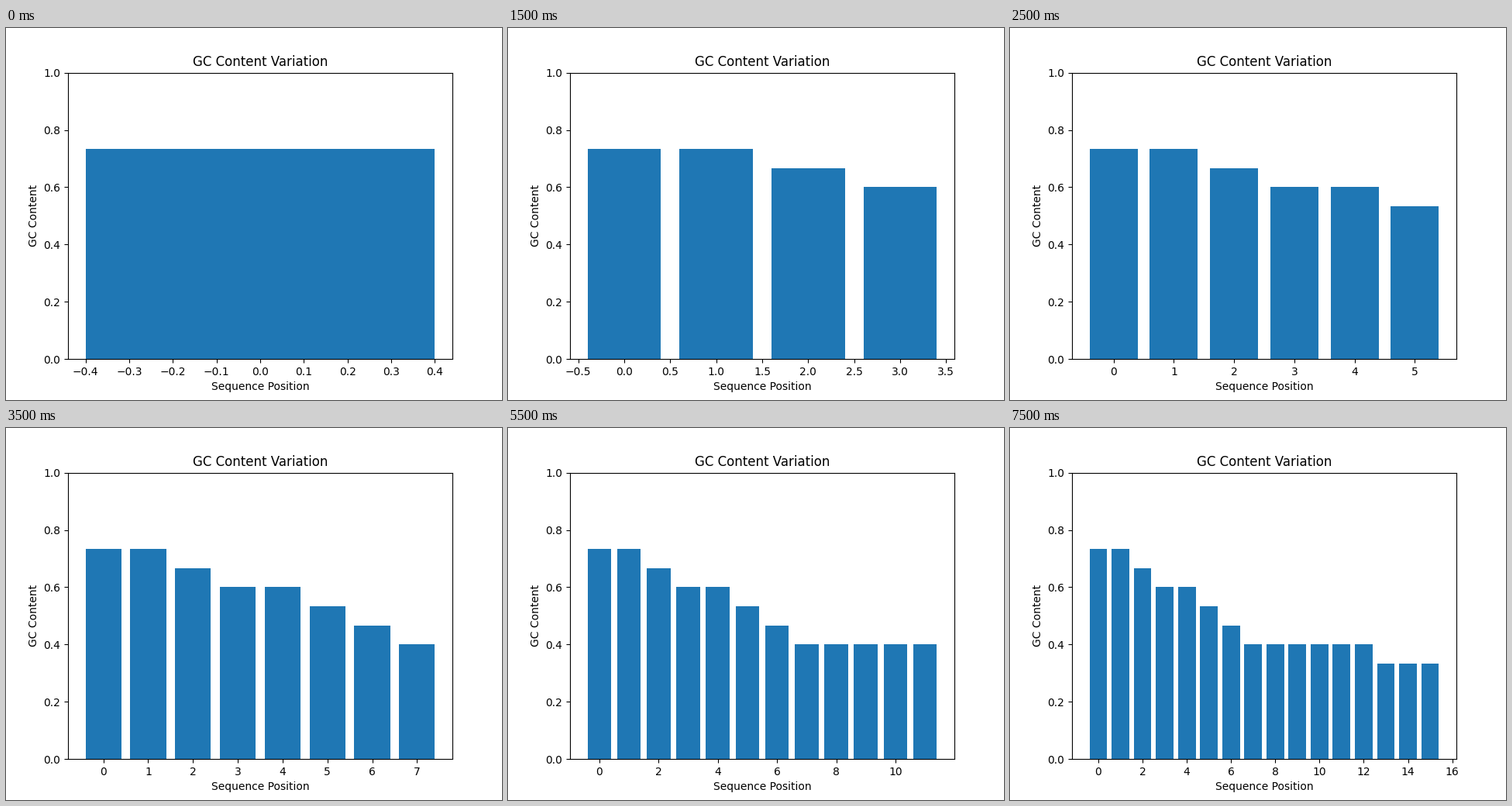
A matplotlib script that plays this animation: 640x480 px, repeating every 8 s.

```python
import matplotlib.pyplot as plt
from matplotlib.animation import FuncAnimation

WINDOW = 15
GC_COUNTS = [11, 11, 10, 9, 9, 8, 7, 6, 6, 6, 6, 6, 6, 5, 5, 5]
gc_content = [count / WINDOW for count in GC_COUNTS]

fig, ax = plt.subplots(figsize=(6.4, 4.8), dpi=100)


def update(i):
    """Show the bars up to position i; the x axis rescales to fit them."""
    ax.clear()
    ax.bar(range(i + 1), gc_content[:i + 1], color="tab:blue")
    ax.set_ylim(0, 1)
    ax.set_title("GC Content Variation")
    ax.set_xlabel("Sequence Position")
    ax.set_ylabel("GC Content")
    return ax.patches


anim = FuncAnimation(fig, update, frames=len(gc_content), interval=500,
                     init_func=lambda: update(0), repeat=True, repeat_delay=0)

plt.show()
```
